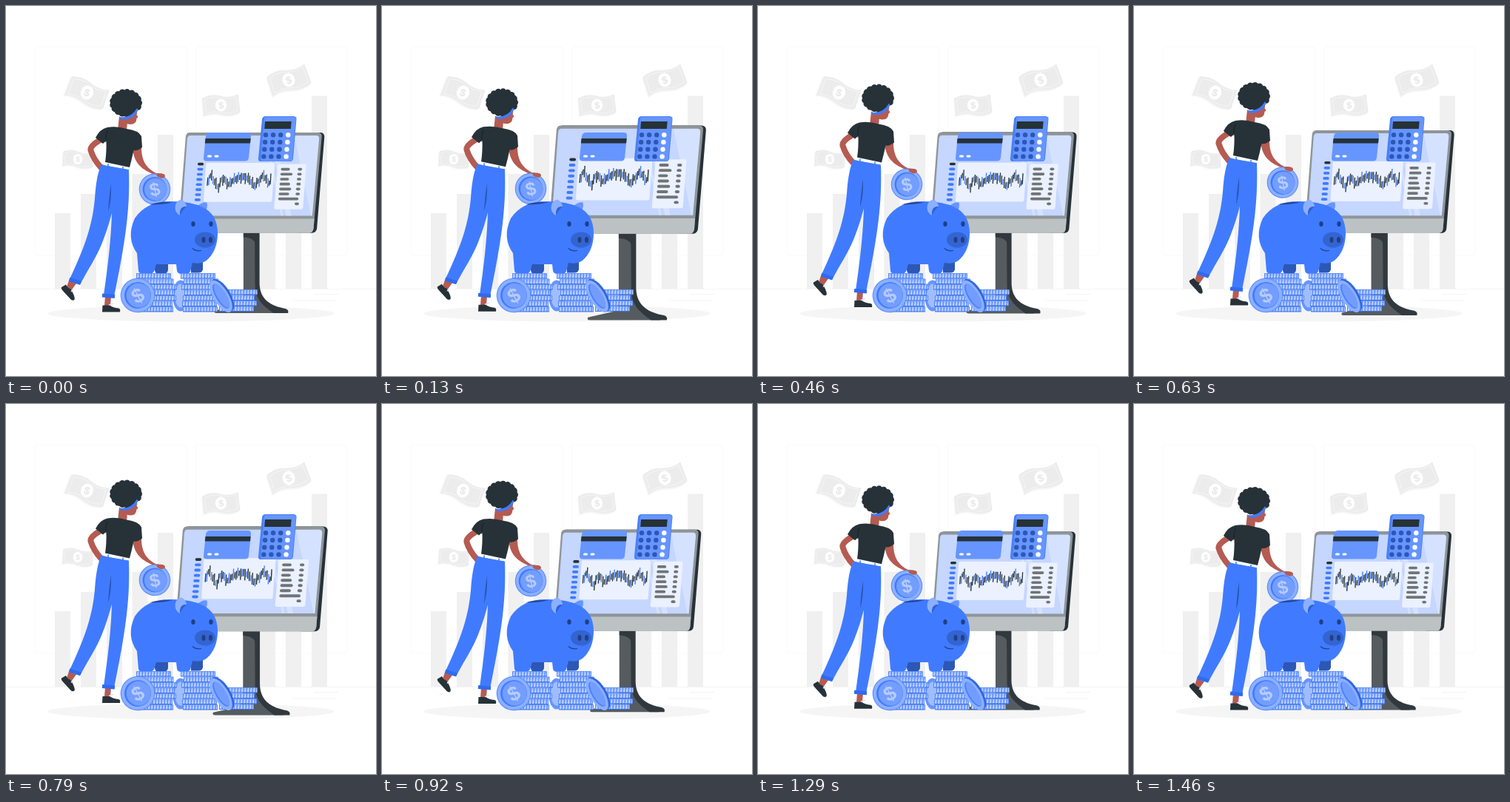
An HTML page for the animation above (1.5 s loop, 500 by 500 pixels).

```html
<!DOCTYPE html>
<html lang="en">
<head>
<meta charset="utf-8">
<title>Savings</title>
<style>
  html, body { margin: 0; width: 100%; height: 100%; overflow: hidden; background: #fff; }
  svg { display: block; width: 100vw; height: 100vh; }
  text { font-family: "Liberation Sans", Arial, sans-serif; font-weight: bold; text-anchor: middle; }
</style>
</head>
<body>
<svg viewBox="0 0 500 500">
  <g fill="none" stroke="#fafafa">
    <rect x="39.5" y="55" width="205" height="282" rx="4"/>
    <rect x="256" y="55" width="205" height="282" rx="4"/>
  </g>
  <path d="M0 382.5H500M416 389.500H449M388 398H446" stroke="#f0f0f0" stroke-width=".7"/>
  <g id="bars" fill="#f0f0f0"></g>
  <g id="notes"></g>
  <ellipse cx="250" cy="415.500" rx="193.500" ry="11" fill="#f5f5f5"/>

  <g id="monitor">
    <path d="M321 304H337V376C338 396 356 405 373 413.500H285Q281 413 283 410L314 403Q321 400 321 385Z" fill="#555b5f"/>
    <path d="M336 304H342.500V374C343 396 358 404 377 407.500Q382 409 380.500 413.500H361C345 402 337 394 336.500 376Z" fill="#31393e"/>
    <path d="M321 306H337V322Q336 313 321 312Z" fill="#31393e"/>
    <path d="M250 172.500H424Q429.500 173 429 179L419 301Q418 306.500 412 306.500H395Z" fill="#263238"/>
    <path d="M249 172.500H421Q426 173 425.500 178L414.500 301Q413.500 306.500 409 306.500H239Q234 306 234.500 301L244 178Q244.500 173 249 172.500Z" fill="#8e9599"/>
    <path d="M235.500 287.500H415.500L414.500 301Q413.500 306.500 409 306.500H239Q234 306 234.500 301Z" fill="#bcc1c4"/>
    <path d="M250 176.500H418Q422.500 176.500 422 181L412.800 283.500H238.500L246 181Q246.500 176.500 250 176.500Z" fill="#c5d6ff"/>
    <path d="M389 177L411 283.500H412.800L422 181Q422 176.500 418 176.500ZM356 177H363L385 283.500H378ZM349 177H352L374 283.500H371Z" fill="#fff" opacity=".28"/>
    <path d="M273 213H361Q363 213 362.800 215L359 263Q359 265 357 265H270Q268 265 268 263L271 215Q271 213 273 213Z" fill="#ebf1ff"/>
    <path d="M369 214.500H403Q405 214.500 404.800 217L400.500 273Q400 275 398 275H364Q362 275 362 273L366.500 217Q367 214.500 369 214.500Z" fill="#ebf1ff"/>
    <g id="screen" stroke-linecap="round"></g>
  </g>

  <path d="M276 171H327Q331.500 171 331 176L328 205Q327.500 209.500 323 209.500H271Q266.500 209.500 267 205L270 176Q271 171 276 171Z" fill="#6695ff"/>
  <path d="M269.500 179H330.700L330 185.500H268.800Z" fill="#263238"/>
  <path d="M273.500 203H276.500M283 203H286" stroke="#fff" stroke-width="3" stroke-linecap="round"/>
  <path d="M350 149H389Q393 149.500 392.500 153L388 206Q387.500 210 384 210H344Q340.500 210 341 206L346 153Q346.500 149.500 350 149Z" fill="#4a80f5"/>
  <path d="M352 150H389Q392 150 391.700 153L387 206Q387 209.500 383 209.500H347Q344 209 344.300 206L349 153Q349 150 352 150Z" fill="#6695ff"/>
  <path d="M350 156H385.700L384.800 166H349.200Z" fill="#263238"/>
  <g id="keys"></g>

  <g id="woman">
    <path d="M129 180Q113 189 114.500 195Q118 207 129 219" fill="none" stroke="#b55b52" stroke-width="8" stroke-linejoin="round"/>
    <path d="M85 371L82 380L87 386L95 375ZM134 392L133 405H141L142 392Z" fill="#b55b52"/>
    <path d="M81 376.500L75 380Q74 382 77 385L88 397Q92 399 92.800 396Q93 393 90 387L87 382Q84 382 81 376.500ZM130.500 404.500H140Q145 408 152 408.500Q155 409 154 413.500H130Z" fill="#263238"/>
    <path d="M88 386L91 383M139 404L145 402" stroke="#dce6ff" stroke-width="1.500"/>
    <path d="M129 214L154 220C151 252 142 290 130 320C121 342 113 352 101 375L85.500 370C108 323 117 294 120 260Q122 228 129 214Z" fill="#407bff"/>
    <path d="M142 240Q143 263 138 278Q139 257 142 240Z" fill="#2c57b5"/>
    <path d="M137 216L166 221C168 275 161 320 146 393L132 391C139 343 146 285 142 237Z" fill="#407bff"/>
    <path d="M85.500 369.500L101 374.500M130 391L147 392.500" stroke="#2f6af0" stroke-width="5"/>
    <path d="M134.500 212L167 218.500V221L133.500 214.500Z" fill="#fff"/>
    <path d="M138 213V217M158 217V221" stroke="#407bff" stroke-width="1.500"/>
    <path d="M153 149L151 168H163L164 157Z" fill="#b55b52"/>
    <path d="M171 190C172 211 182 219 194 225L206 231Q211 235 214.500 231Q216 227 210 226.500L203 226C192 220 183 212 183 191Z" fill="#b55b52"/>
    <path d="M137 164Q150 162 163 166Q179 168 183 176L184 191Q178 196 172.500 195Q170 207 167 218L134 211Q136 198 135.500 182L131 186L121 178Q127 166 137 164Z" fill="#263238"/>
    <path d="M137 168Q134 176 135 184" stroke="#172126" fill="none"/>
    <path d="M157 152L176 138Q178 144 176.500 147L178.500 150L176.500 152Q176 160 168 160Q161 160 157 152Z" fill="#b55b52"/>
    <g id="hair" fill="#263238"></g>
    <path d="M154 150Q169 152 177 138L178.500 140.500Q172 155 155 153.500Z" fill="#407bff"/>
    <g id="heldCoin"></g>
    <path d="M203 226L210 226.500Q216 227 214.500 231Q211 235 204 230Z" fill="#b55b52"/>
  </g>

  <path d="M201 345H219V357Q218 362 212 362H205Q201 361 201 356ZM250 345H266V356Q265 360.500 260 360.500H250Z" fill="#2c57b5"/>
  <path d="M259 270Q266 264 271.500 265.500Q273 272 269 279Z" fill="#6695ff"/>
  <path d="M177 334L179 358Q180 362 185 362H195Q200 361 201 356L203 349H230L231 358Q232 362 237 362H244Q249 361 249.500 357L252 347Q266 350 274 341Q286 328 286 307Q286 282 266 272Q250 264 224 264Q190 263 174 287Q162 313 177 334Z" fill="#407bff"/>
  <path d="M194 268.500Q207 263.500 225 265.500Q212 268.500 194 268.500Z" fill="#24489c"/>
  <path d="M229 276Q227 264 237 261.500Q243 264 244 271Q236 271 235 283Q231 281 229 276Z" fill="#8cb0ff"/>
  <path d="M235 283Q234 270 244 271Q240 274 235 283Z" fill="#2f63d6"/>
  <ellipse cx="269" cy="316" rx="14" ry="10.500" fill="#3464cf"/>
  <g fill="#203f87">
    <ellipse cx="267" cy="316" rx="2.500" ry="4"/><ellipse cx="276.500" cy="316" rx="2.500" ry="4"/>
    <ellipse cx="253" cy="294.500" rx="2.700" ry="3.500"/><ellipse cx="277" cy="294.500" rx="2.700" ry="3.500"/>
  </g>
  <path d="M252 327.500Q257 332 264 330.500" fill="none" stroke="#203f87" stroke-width="1.200"/>

  <ellipse cx="236" cy="391.500" rx="11" ry="21" fill="#6695ff"/>
  <ellipse cx="236" cy="391.500" rx="8" ry="16" fill="#a0bdff"/>
  <g id="stacks"></g>
  <g transform="rotate(-31 291 392)">
    <ellipse cx="292.500" cy="392" rx="11" ry="25" fill="#3268e0"/>
    <ellipse cx="290.500" cy="392" rx="10" ry="24.500" fill="#8cb0ff"/>
    <ellipse cx="290.500" cy="392" rx="7" ry="19" fill="#4a82ff"/>
    <ellipse cx="291.500" cy="392" rx="6" ry="18" fill="#729dff"/>
  </g>
  <g id="floorCoin"></g>
</svg>
<script>
const $ = id => document.getElementById(id);
const add = (id, markup) => { $(id).innerHTML += markup; };
const dash = (x, y, w, color) =>
  `<path d="M${x + 1.8} ${y}h${w - 3.6}" stroke="${color}" stroke-width="3.600"/>`;

// Piecewise linear value through [position, value] points
function along(points, p) {
  const i = Math.max(1, points.findIndex(q => q[0] >= p));
  const [a, b] = [points[i - 1], points[i]];
  return a[1] + (b[1] - a[1]) * (p - a[0]) / (b[0] - a[0]);
}

for (const [x, y] of [[66, 280], [101, 254], [136, 262], [170.5, 227], [205, 174], [343, 200], [378, 200], [413, 121.5]])
  add('bars', `<rect x="${x}" y="${y}" width="21" height="${382 - y}"/>`);

function note(x, y, angle, size) {
  const sheet = 'M-27 -13Q-13 -19 0 -14T27 -14L28 13Q14 19 0 14T-27 14Z';
  add('notes', `<g transform="translate(${x} ${y}) rotate(${angle}) scale(${size})">
    <path d="${sheet}" fill="#f5f5f5" transform="translate(-1.500 2)"/>
    <path d="${sheet}" fill="#ececec"/>
    <path d="${sheet}" fill="none" stroke="#f7f7f7" transform="scale(.87 .8)"/>
    <ellipse rx="8.500" ry="9.500" fill="#fff"/>
    <text y="5" font-size="14" fill="#e6e6e6">$</text></g>`);
}
note(109.5, 117, 21, 1);
note(382, 100, -18, 1);
note(290.500, 134, -5, .9);
note(97, 207, 3, .74);

// Screen contents
for (let i = 0; i < 8; i++)
  add('screen', dash(260 - i * .6, 214.7 + i * 6.8, 8, i ? '#407bff' : '#263238'));
const trend = [[0, 238], [5, 229], [10, 240], [15, 246], [19, 234], [24, 237], [28, 242], [33, 237],
  [38, 234], [45, 232], [52, 233], [57, 236], [62, 244], [68, 238], [75, 229], [81, 241], [85, 234]];
for (let i = 0; i < 46; i++) {
  const x = i * 1.87, h = 5.5 + 2 * Math.sin(i * 2.4);
  const y = along(trend, x) + 1.5 * Math.sin(i * 1.9);
  add('screen', `<path d="M${273.5 + x} ${y - h}l-.8 ${2 * h}" stroke-linecap="butt"
    stroke="${i % 3 == 1 ? '#407bff' : '#263238'}" stroke-width="1.300"/>`);
}
[12, 16, 12, 14, 16, 14, 27, 0].forEach((w, i) => {
  const y = 221.5 + i * 6.6, x = 371 - i * .6;
  if (w) add('screen', dash(x, y, w, '#707478'));
  if (i != 6) add('screen', dash(x + 22.5, y, 5.8, '#707478'));
});

for (let row = 0; row < 4; row++)
  for (let col = 0; col < 4; col++)
    add('keys', `<circle cx="${351 + col * 10.1 - row * .9}" cy="${174.3 + row * 9.7}" r="3.200"
      fill="${col < 3 ? '#2c57b5' : '#fff'}"/>`);

// Curly hair
add('hair', '<ellipse cx="161" cy="132" rx="18.500" ry="17"/>');
for (let i = 0; i < 17; i++) {
  const a = i * Math.PI * 2 / 17;
  if (a < .5 || a > 1.25)
    add('hair', `<circle cx="${162 + 17.5 * Math.cos(a)}" cy="${131 + 14.5 * Math.sin(a)}" r="4.500"/>`);
}

function coin(id, x, y, r, angle) {
  add(id, `<g transform="translate(${x} ${y}) rotate(${angle})">
    <circle r="${r}" fill="#5f90ff"/><circle r="${r - 1.2}" fill="#8cb0ff"/>
    <circle r="${r * .77}" fill="#407bff"/><circle cx="1" cy=".6" r="${r * .71}" fill="#739eff"/>
    <text y="${r * .42}" font-size="${r * 1.18}" fill="#b6ccff">$</text></g>`);
}
coin('heldCoin', 201, 247.5, 21.3, -12);
coin('floorCoin', 178, 391, 23.3, -28);

function stack(x, y, offsets) {
  offsets.forEach((shift, i) => {
    const left = x + shift, top = y + i * 7.5;
    add('stacks', `<rect x="${left}" y="${top}" width="47" height="7.300" rx="1" fill="#4f85ff"/>
      <path d="M${left + 1} ${top + 3.6}h45" stroke="#a9c3ff" stroke-width="5.600" stroke-dasharray="2.800 1.200"/>
      <path d="M${left + 1} ${top + 5}h45" stroke="#d0deff" stroke-width="2.500" stroke-dasharray="1 3"/>
      <path d="M${left} ${top + 7}h47" stroke="#3268e0" stroke-width=".7"/>`);
  });
}
stack(176, 361, [0, 3.5, 8, 5, 7, 2, 3]);
stack(236, 361, [0, 4, 1, 5, 3, 2, 3]);
stack(290, 383, [3, -1, 2, -2]);

const pulse = [[-20, 0], [130, 1], [330, .4], [560, 0], [580, 0], [630, .4], [690, 1], [790, .64], [930, .22], [1070, 0], [1480, 0]];

function draw(now) {
  const t = now % 1500;
  const scale = 1 + .092 * along(pulse, t >= 1480 ? t - 1500 : t);
  const lift = 4.8 * (Math.cos(t / 1500 * Math.PI * 2) - 1);
  $('monitor').setAttribute('transform', `translate(333 293) scale(${scale}) translate(-333 -293)`);
  $('woman').setAttribute('transform', `translate(0 ${lift})`);
  requestAnimationFrame(draw);
}
draw(performance.now());
</script>
</body>
</html>
```
